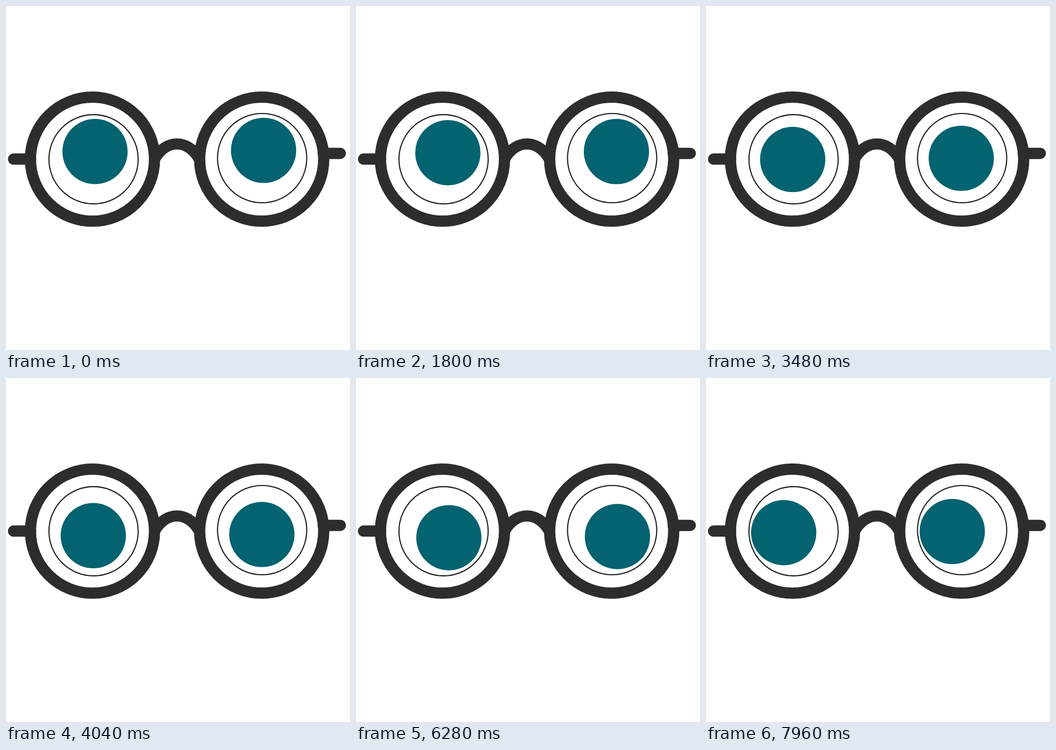
Write an HTML page that moves like this. It is 640 px wide and 640 px high and loops after 8 s.

```html
<!DOCTYPE html>
<html lang="en">
<head>
<meta charset="utf-8">
<title>Looking around</title>
<style>
  html, body { margin: 0; width: 100%; height: 100%; overflow: hidden; background: #fff; }
  svg { display: block; width: 100%; height: 100%; }
  .frame { fill: none; stroke: #2d2d2d; stroke-width: 20.9; }
  .ring { fill: none; stroke: #1d1d1d; stroke-width: 2.1; }
  .pupil { fill: #046370; }
</style>
</head>
<body>
<svg viewBox="0 0 640 640">
  <g class="frame">
    <path d="M14 284.8H46M590 274.2H622" stroke-linecap="round"/>
    <path d="M277 284C297 247.5 339 247.5 359 284"/>
    <circle cx="160.9" cy="284.9" r="115.4"/>
    <circle cx="475.7" cy="284.9" r="115.4"/>
  </g>
  <circle class="ring" cx="162.9" cy="285.1" r="83"/>
  <circle class="ring" cx="476.5" cy="283" r="83"/>
  <g class="pupil" id="pupils">
    <circle r="60.7"/>
    <circle cx="313.6" cy="-2.2" r="60.7"/>
  </g>
</svg>
<script>
const LOOP = 8000, STEP = 112;
// Key points of the left pupil, one every SPAN steps; the loop begins LEAD steps in.
const SPAN = 10, LEAD = 4;
const xs = [155.4, 177.5, 170.9, 162.1, 162.4, 168.8, 172.8, 156, 132.3];
const ys = [272.5, 269.1, 273, 278.5, 293.3, 304.2, 297.2, 285.3, 292.7];
const pupils = document.getElementById('pupils');

// Smooth curve through evenly spaced points; the ends continue straight.
function spline(p, pos) {
  const i = Math.floor(pos), u = pos - i, v = 1 - u;
  const a = p[i], b = p[i + 1];
  const before = p[i - 1] ?? 2 * a - b, after = p[i + 2] ?? 2 * b - a;
  const slopeA = (b - before) / 2, slopeB = (after - a) / 2;
  return a * v * v * (1 + 2 * u) + b * u * u * (1 + 2 * v)
    + u * v * (slopeA * v - slopeB * u);
}

function draw() {
  const step = Math.floor(performance.now() % LOOP / STEP);
  const pos = (step + LEAD) / SPAN;
  pupils.setAttribute('transform', `translate(${spline(xs, pos)} ${spline(ys, pos)})`);
  requestAnimationFrame(draw);
}
draw();
</script>
</body>
</html>
```
